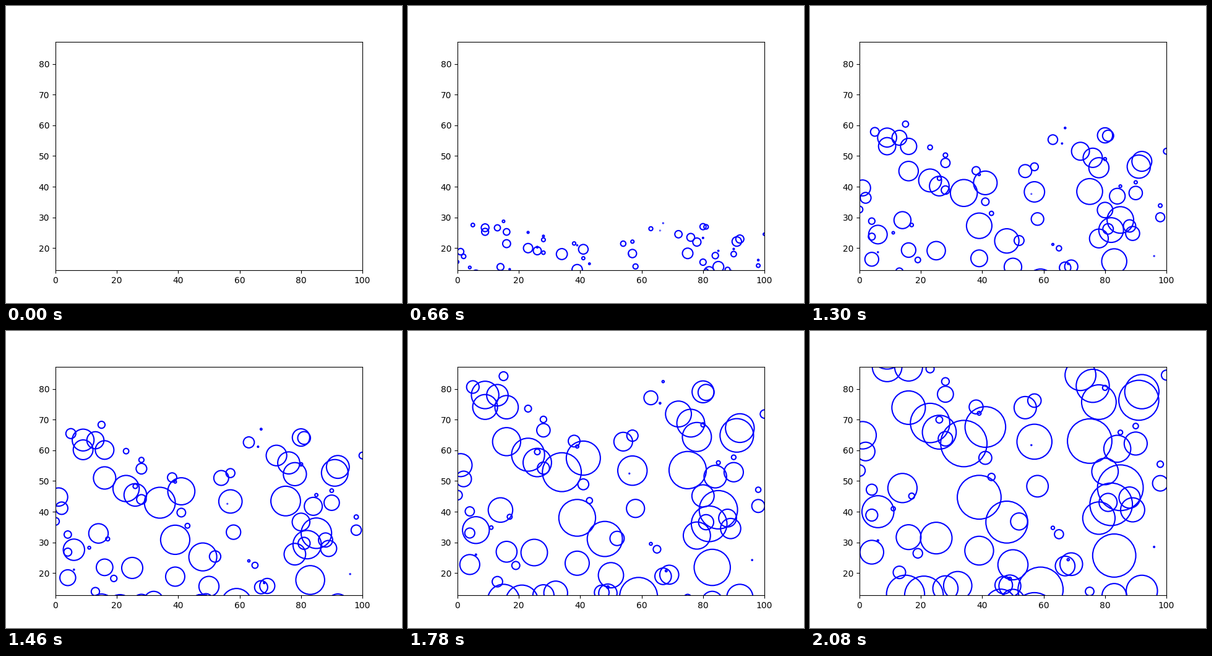
A matplotlib script that plays this animation: 640x480 px, repeating every 2.1 s.

```python
import numpy as np
import matplotlib.pyplot as plt
from matplotlib.animation import FuncAnimation
from matplotlib.patches import Circle

FRAMES, INTERVAL = 105, 20
LAST = FRAMES - 1
RISE_START, GROW_START = 4, 11

# (x, final height), widest bubble first
BUBBLES = [
    (34, 62.2), (85, 47.8), (59, 14.6), (75, 63.0), (39, 44.7),
    (83, 25.7), (82, 42.4), (48, 36.6), (57, 6.9), (41, 67.6),
    (91, 76.3), (23, 68.9), (21, 12.7), (15, 13.1), (57, 62.8),
    (78, 75.7), (92, 79.1), (26, 65.9), (16, 73.9), (76, 81.0),
    (9, 91.8), (78, 37.9), (6, 40.0), (25, 31.4), (92, 14.2),
    (72, 84.5), (46, 9.8), (50, 22.7), (9, 87.2), (14, 47.7),
    (39, 27.3), (32, 15.9), (16, 87.1), (1, 64.9), (84, 60.5),
    (80, 53.1), (80, 93.0), (13, 91.7), (28, 15.0), (16, 31.7),
    (83, 12.6), (89, 40.6), (4, 26.8), (50, 10.9), (90, 62.2),
    (69, 22.9), (54, 73.9), (49, 15.8), (58, 48.3), (88, 44.6),
]
RANK = [0, 13, 14, 27, 38, 49]
SIZE = [7.55, 6.2, 5.7, 4.9, 4.1, 3.45]

# Small bubbles scattered among the others
SMALL = 42
rng = np.random.default_rng(5)
small_x = rng.integers(0, 101, SMALL)
small_top = rng.permutation(np.linspace(14, 99, SMALL))
small_size = 3.2 * np.linspace(1, 0.07, SMALL) ** 1.2

x, top = np.array(BUBBLES).T
size = np.interp(np.arange(len(x)), RANK, SIZE)
x = np.concatenate([x, small_x])
top = np.concatenate([top, small_top])
size = np.concatenate([size, small_size])

fig, ax = plt.subplots(figsize=(6.4, 4.8), dpi=100)
half = 50 * 369.6 / 496  # equal scale on both axes
ax.set(xlim=(0, 100), ylim=(50 - half, 50 + half))

circles = [
    ax.add_patch(Circle((cx, 0), 0, fill=False, ec="blue", lw=1.5))
    for cx in x
]


def progress(i, start):
    return max(0, i - start) / (LAST - start)


def update(i):
    heights = top * progress(i, RISE_START)
    radii = size * progress(i, GROW_START)
    for circle, cx, cy, r in zip(circles, x, heights, radii):
        circle.center = cx, cy
        circle.radius = r
    return circles


anim = FuncAnimation(fig, update, frames=FRAMES, interval=INTERVAL,
                     repeat=True, repeat_delay=0)
plt.show()
```
